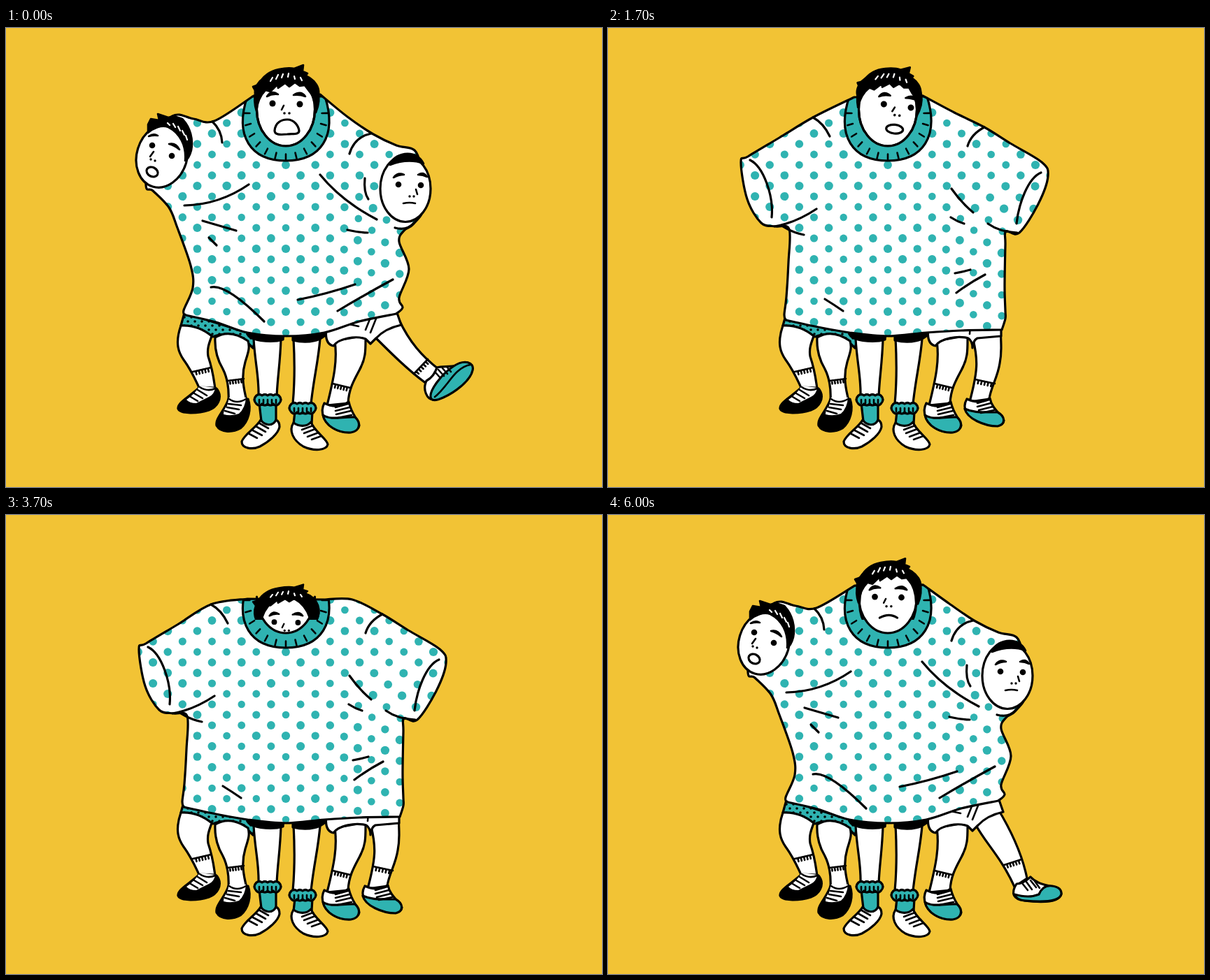
These frames come from a looping animation (852x657 px, 6.1 s). An HTML page:

```html
<!DOCTYPE html>
<html lang="en">
<head>
<meta charset="utf-8">
<title>Three in one shirt</title>
<style>
html,body{margin:0;width:100%;height:100%;overflow:hidden;background:#f2c335}
svg{display:block;width:100%;height:100%}
path,ellipse,circle{fill:none;stroke:#000;stroke-width:3.2;stroke-linecap:round;stroke-linejoin:round}
.w{fill:#fff}
.t{fill:#2fb3b1}
.k{fill:#000}
.thin{stroke-width:2.6}
.dot{fill:#000;stroke:none}
.spot{fill:#2fb3b1;stroke:none}
.shine{stroke:#fff;stroke-width:2.2}
.white{fill:#fff;stroke:none}
</style>
</head>
<body>
<svg viewBox="0 0 852 657">
  <defs>
    <clipPath id="bodyClip"><path id="bodyClipPath"/></clipPath>
    <clipPath id="leftClip"><path id="leftClipPath"/></clipPath>
    <clipPath id="rightClip"><path id="rightClipPath"/></clipPath>
    <clipPath id="neckClip">
      <path d="M300 0H500V150H300Z"/>
      <path d="M358.500 117A41.500 52 0 0 0 441.500 117Z"/>
    </clipPath>
    <clipPath id="shortsClip"><path d="M255 408L250 426Q275 427 296 442Q320 432 345 450L353 458L358 440Z"/></clipPath>
  </defs>

  <!-- left pair of legs -->
  <path class="t" d="M255 408L250 426Q275 427 296 442Q320 432 345 450L353 458L358 440Z"/>
  <g id="shortsDots" clip-path="url(#shortsClip)"></g>
  <path class="w" d="M250 426C241 452 247 465 254 475C262 486 269 499 277 517L299 517C297 500 294 485 289 470C287 458 291 450 294 441Q275 425 250 426Z"/>
  <path class="w" d="M299 443C298 462 304 478 310 488C316 500 319 515 318 533L344 533C338 510 337 495 342 478C346 465 349 458 346 448Q320 430 299 443Z"/>
  <path class="k" d="M277 514C262 528 245 536 246 545C249 553 275 552 290 547C303 542 308 530 304 521Q301 514 297 515Z"/>
  <path class="white" d="M277 512L299 515Q298 524 290 528L272 537Q262 537 258 532Q270 524 277 512Z"/>
  <path class="thin" d="M277 514Q288 521 299 516M274 518l13 8M269 523l12 7M264 528l10 6"/>
  <path class="k" d="M318 531C314 546 299 558 301 569C307 580 325 579 335 573C347 563 351 545 346 531Z"/>
  <path class="white" d="M319 529L343 529Q342 544 333 552Q322 556 311 553Q311 546 316 541Z"/>
  <path class="thin" d="M319 531Q330 539 343 531M318 538l18 2M316 543l17 3M313 548l14 4"/>

  <!-- middle pair of legs -->
  <path class="w" d="M354 445C356 480 362 500 361 528H387C388 500 392 480 393 445Z"/>
  <path class="w" d="M411 445C413 480 413 505 410 538H436C440 500 446 480 449 445Z"/>
  <path class="k" d="M345 436C344 448 380 451 396 446L397 436Z"/>
  <path class="k" d="M410 436V447C430 452 455 449 461 432Z"/>
  <path class="t" d="M362 537L365 563Q375 574 386 565V537Z"/>
  <path class="t" d="M413 549L411 567Q424 575 437 566L438 549Z"/>
  <path class="w" d="M364 561C359 571 340 582 337 592C337 602 352 604 363 599C376 592 389 581 391 571Q391 563 386 561C381 571 370 569 364 561Z"/>
  <path class="w" d="M411 565C404 576 410 590 425 599C440 606 458 605 460 596C459 588 440 577 436 564C429 572 418 570 411 565Z"/>
  <path class="thin" d="M361 565l14 8M357 570l14 8M351 575l15 8M346 580l13 7M439 569l-16 6M442 574l-16 6M447 579l-16 6M451 584l-14 5"/>
  <g id="cuffs"></g>

  <!-- right pair of legs -->
  <path class="w" d="M470 448C474 475 469 500 459 540L489 537C490 517 497 505 505 490C515 472 514 460 514 440Z"/>
  <path class="w" d="M455 537C448 550 455 566 470 574C485 581 503 580 505 569C503 560 494 553 490 535Q473 546 455 537Z"/>
  <path class="t" d="M453 554C465 562 480 556 499 557C508 565 506 577 493 579C474 580 456 569 453 554Z"/>
  <path class="thin" d="M471 543l18-5M471 548l20-5M472 553l21-5M474 558l20-4"/>
  <g id="legDown">
    <path class="w" d="M522 446C529 475 529 490 517 535L545 531C547 515 557 500 560 480C563 465 562 450 561 430Z"/>
    <path class="w" d="M513 531C506 543 511 552 527 561C543 571 564 573 566 562C563 553 549 546 546 530Q530 539 513 531Z"/>
    <path class="t" d="M510 545C525 552 540 549 557 550C568 556 569 567 557 570C538 570 513 559 510 545Z"/>
    <path class="thin" d="M528 537l17-5M528 542l19-5M530 547l20-5M533 551l19-4"/>
    <path class="w" d="M458 430Q455 452 468 455C476 444 500 440 515 444Q521 448 521 458Q522 447 528 444L562 441V420H460Z"/>
    <path class="thin" d="M518 426L517 438"/>
  </g>
  <g id="legMid">
    <path class="w" d="M526 444C540 470 562 490 581 532L599 520C593 490 580 458 557 420Z"/>
    <path class="w" d="M584 528C575 542 580 550 595 552C620 555 646 555 648 542C644 528 618 534 604 518Q593 528 584 528Z"/>
    <path class="t" d="M581 543Q602 549 616 543Q622 529 635 531Q649 533 648 543C644 555 618 554 596 552Q584 551 581 543Z"/>
    <path class="thin" d="M592 527l8 10M598 525l8 11M604 523l8 10M610 524l7 10"/>
  </g>
  <g id="legUp">
    <path class="w" d="M527 442C550 465 575 490 601 509L618 488C595 470 577 450 562 418Z"/>
    <path class="w" d="M601 505C595 518 602 531 610 532C635 525 655 500 660 479C640 487 625 483 616 486Q612 499 601 505Z"/>
    <path class="t" d="M608 531C602 521 624 494 640 484C655 474 670 478 667 490C664 505 641 522 625 529Q612 535 608 531Z"/>
    <path class="thin" d="M613 528C626 518 635 501 645 492Q655 483 664 482M613 492l8 9M618 489l8 9M624 487l7 8M631 486l5 6"/>
  </g>
  <g id="shortsOut">
    <path class="w" d="M458 430Q455 452 468 455C476 444 500 440 514 445L521 452L529 444Q542 430 565 425L558 405H470Z"/>
    <path class="thin" d="M486 423L504 427M522 412L514 432M531 411L521 436"/>
  </g>
  <g id="frills"></g>

  <!-- shirt -->
  <path id="shirt" class="white"/>
  <g clip-path="url(#bodyClip)">
    <g id="spots"></g>
    <path class="t" d="M345 98C326 155 350 190 400 190C450 190 474 155 456 98Z"/>
    <path id="ticks" class="thin"/>
  </g>
  <path id="outline"/>

  <!-- folds: d with the head out, data-in with the sleeve empty -->
  <g id="leftFolds">
    <path d="M295 134Q308 146 309 164" data-in="M293 128Q308 136 317 155"/>
    <path d="M255 254Q305 253 347 224" data-in="M238 284Q268 279 298 259"/>
    <path d="M281 276Q305 283 329 290" data-in="M250 284Q264 293 280 296"/>
    <path d="M293 371Q315 366 369 420" data-in="M310 388Q323 396 336 405"/>
    <path id="leftEdge" d="M250 125C275 148 280 210 225 240" data-in="M203 189C222 198 237 240 234 271"/>
  </g>
  <g id="rightFolds">
    <path d="M522 151Q498 156 491 180" data-in="M538 142Q519 152 514 169"/>
    <path d="M449 210Q480 248 530 274" data-in="M491 230Q505 250 522 264"/>
    <path d="M488 289Q500 292 517 293" data-in="M490 271Q499 277 509 280"/>
    <path d="M556 286Q573 291 584 278" data-in="M543 280Q560 292 585 293"/>
    <path d="M417 389Q458 381 499 367" data-in="M496 351Q507 349 518 346"/>
    <path d="M474 405Q514 381 553 360" data-in="M498 379Q518 364 539 353"/>
    <path id="rightEdge" d="M560 172C525 205 523 250 560 285" data-in="M619 207C600 215 587 252 584 280"/>
  </g>
  <path id="leftCrease" d="M290 300L301 311"/>
  <path id="rightCrease" d="M513 215Q511 235 518 245"/>

  <!-- heads -->
  <g id="leftWrap"><g id="leftHead">
    <ellipse class="w" cx="223" cy="183" rx="36" ry="46" transform="rotate(17 223 183)"/>
    <path class="k thin" d="M203 150L203 138L207 130L219 132L217 123L232 128L240 126L252 130C264 142 268 160 265 175Q262 187 256 190C258 168 248 150 232 142C222 138 210 144 203 150Z"/>
    <path class="shine" d="M231 136l3 3M239 137l3 5M246 141l3 6M252 147l3 6M257 154l2 6"/>
    <path class="k thin" d="M204 155Q211 150 217 154Q211 153 204 155ZM233 166Q243 164 248 174Q241 168 233 166Z"/>
    <circle class="dot" cx="209" cy="168" r="4.3"/><circle class="dot" cx="237" cy="183" r="4.3"/>
    <path class="thin" d="M211 177L206 184"/>
    <circle class="dot" cx="207" cy="188" r="1.7"/><circle class="dot" cx="213" cy="190" r="1.7"/>
    <ellipse class="w" cx="209" cy="206" rx="8.5" ry="6.5" transform="rotate(28 209 206)"/>
  </g></g>
  <g id="rightWrap"><g id="rightHead">
    <ellipse class="w" cx="571" cy="230" rx="36" ry="47.5"/>
    <path class="k thin" d="M549 196Q553 183 570 180Q589 178 597 194Q575 186 549 196Z"/>
    <path class="k thin" d="M554 214Q560 206 569 210Q561 210 554 214ZM589 210Q597 205 602 213Q596 210 589 210Z"/>
    <circle class="dot" cx="561" cy="224" r="4.3"/><circle class="dot" cx="593" cy="225" r="4.3"/>
    <path class="thin" d="M586 231L588 238M568 251Q577 249 585 251"/>
    <circle class="dot" cx="577" cy="241" r="1.7"/><circle class="dot" cx="583" cy="241" r="1.7"/>
  </g></g>
  <g clip-path="url(#neckClip)"><g id="head">
    <ellipse class="dot" cx="401.500" cy="92" rx="47" ry="31"/>
    <g id="skull"><ellipse class="w" cx="400" cy="117" rx="41.5" ry="52"/></g>
    <g id="face">
      <path class="k thin" d="M373 98Q379 88 389 95Q380 94 373 98ZM411 96Q422 89 428 98Q420 95 411 96Z"/>
      <circle class="dot" cx="381" cy="108" r="4.5"/><circle class="dot" cx="420" cy="109" r="4.5"/>
      <path class="thin" d="M397 111L394 117"/>
      <circle class="dot" cx="398" cy="122" r="1.8"/><circle class="dot" cx="405" cy="122" r="1.8"/>
      <path id="mouthWide" class="w" d="M384 147C385 135 394 131 402 131C412 131 418 140 419 147C419 153 410 151 402 152C392 153 384 153 384 147Z"/>
      <ellipse id="mouthSmall" class="w" cx="400" cy="142" rx="12" ry="6.3"/>
      <path id="mouthSad" d="M388 139Q402 131 414 139"/>
    </g>
    <g id="hair">
      <path class="k thin" d="M358 119Q353 104 357 91L353 84L361 81Q370 63 390 59Q404 56 412 58L425 53L424 62L431 65L428 69Q441 74 446 90Q450 104 443 121Q441 98 433 90L427 82L420 83L413 78L405 84L399 79L389 86L388 81L378 91L371 89Q360 100 358 119Z"/>
      <path class="shine" d="M378 76l3-5M386 73l3-6M394 71l2-5M403 70l1-5M412 69l1 4M421 71l2 4"/>
    </g>
  </g></g>
  <path d="M358.500 117A41.500 52 0 0 0 441.500 117"/>
</svg>
<script>
const $ = id => document.getElementById(id);
const attr = (id, name, v) => $(id).setAttribute(name, v);
const show = (id, on) => { $(id).style.display = on ? '' : 'none'; };
const mix = (a, b, k) => a.map((v, i) => v + (b[i] - v) * k);
const ramp = (t, a, b) => Math.max(0, Math.min(1, (t - a) / (b - a)));
const within = (t, a, b) => t >= a && t < b ? 1 : 0;

// Blend two paths that share the same commands
function morph(from, to, k) {
  const nums = to.match(/\d+/g);
  let i = 0;
  return from.replace(/\d+/g, v => (+v + (nums[i++] - v) * k).toFixed(1));
}

// Smooth cubic segments through a flat x,y list, without the first move
function curve(p) {
  const n = p.length / 2 - 1;
  const at = (i, c) => p[2 * Math.max(0, Math.min(n, i)) + c];
  let d = '';
  for (let i = 0; i < n; i++) {
    const lead = c => (at(i, c) + (at(i + 1, c) - at(i - 1, c)) / 6).toFixed(1);
    const tail = c => (at(i + 1, c) - (at(i + 2, c) - at(i, c)) / 6).toFixed(1);
    d += `C${lead(0)} ${lead(1)} ${tail(0)} ${tail(1)} ${at(i + 1, 0)} ${at(i + 1, 1)}`;
  }
  return d;
}
const reverse = p => p.map((_, i) => p[p.length - 2 - i + 2 * (i % 2)]);

// Sides of the shirt, neck to hem
const points = s => s.split(/[ ,]/).map(Number);
const sides = {
  left: {
    out: points('354,97 298,133 268,130 238,126 205,165 200,225 210,233 233,257 245,286 264,340 267,372 254,404 257,411'),
    in: points('352,99 293,128 245,157 200,184 190,192 199,245 219,279 240,284 259,288 258,335 255,385 252,410 254,418')
  },
  right: {
    out: points('449,95 488,127 525,152 558,168 584,175 592,200 598,255 582,281 569,290 562,306 576,345 562,386 567,400 558,409'),
    in: points('450,97 495,121 538,142 575,165 620,192 629,212 615,252 588,293 569,291 568,310 567,370 568,405 568,416 563,432')
  }
};

// One sleeve: k = 0 head out, 1 empty; returns its side of the shirt
function sleeve(side, k, far) {
  for (const f of $(side + 'Folds').children) {
    f.out = f.out || f.getAttribute('d');
    const own = f.id ? k * k : k;
    f.setAttribute('d', morph(f.out, f.dataset.in, own));
  }
  const edge = $(side + 'Edge').getAttribute('d');
  show(side + 'Edge', k > .3);
  show(side + 'Crease', k < .5);
  attr(side + 'ClipPath', 'd', `${edge}V340H${far}V100Z`);
  attr(side + 'Wrap', 'clip-path', k > .3 ? `url(#${side}Clip)` : 'none');
  show(side + 'Wrap', k < 1);
  return mix(sides[side].out, sides[side].in, k);
}

function draw(t) {
  const l = ramp(t, 900, 1300) - ramp(t, 4600, 5100) ** 2;
  const r = ramp(t, 1100, 1600) - ramp(t, 5000, 5300) ** 2;
  const drop = ramp(t, 3400, 3700) - ramp(t, 5800, 6050);
  const turn = within(t, 1700, 2200) - within(t, 2300, 2600) + within(t, 2700, 3000);
  const pose = t < 1300 ? 'legUp' : t < 1400 || t >= 6000 ? 'legMid' : 'legDown';
  const mouth = t < 1600 ? 'mouthWide' : t < 5900 ? 'mouthSmall' : 'mouthSad';

  const a = sleeve('left', l, 100), b = sleeve('right', r, 720);
  a[0] -= 7 * drop; a[1] += 21 * drop;
  b[0] += 6 * drop; b[1] += 24 * drop;
  const hem = [...a.slice(-2), 300, 421 + 7 * l, 345, 436, 400, 441, 455, 436, 505, 420 + 13 * r, ...b.slice(-2)];
  const body = `M${a[0]} ${a[1]}` + curve(a) + curve(hem) + curve(reverse(b)) + 'Z';
  for (const id of ['shirt', 'outline', 'bodyClipPath']) attr(id, 'd', body);

  const hide = k => ramp(k, .9, 1);
  attr('leftHead', 'transform', `translate(${24 * l + 45 * hide(l)} ${20 * l}) rotate(${34 * l} 215 215)`);
  attr('rightHead', 'transform', `translate(${-45 * hide(r)} ${6 * r})`);

  const size = 1 - .13 * drop;
  const shrink = `translate(400 109) scale(${size}) translate(-400 -109)`;
  attr('head', 'transform', `translate(0 ${47 * drop})`);
  attr('skull', 'transform', shrink);
  attr('face', 'transform', `translate(${13 * turn} ${3 * Math.abs(turn) - 2 * drop}) rotate(${6 * turn} 401 110) ${shrink}`);
  attr('hair', 'transform', `rotate(${7 * turn} 401 110) translate(0 ${10 * drop}) scale(1 ${1 - .2 * drop})`);

  for (const id of ['mouthWide', 'mouthSmall', 'mouthSad']) show(id, id === mouth);
  for (const id of ['legDown', 'legMid', 'legUp']) {
    show(id, id === pose);
    show(id + 'Frill', id === pose);
  }
  show('shortsOut', pose !== 'legDown');
}

// Fixed details
const circle = (x, y, r, cls) => `<circle class="${cls}" cx="${x}" cy="${y}" r="${r}"/>`;
let seed = 7;
const rand = () => (seed = seed * 16807 % 2147483647) / 2147483647;

// Staggered spots; the cloth sags a little at the lower right
let spots = '';
for (let k = -11; k <= 11; k++)
  for (let y = k % 2 ? 91 : 106; y < 450; y += 30) {
    const x = 400 + 21.1 * k;
    const sag = ramp(x, 470, 550) * ramp(y, 220, 300);
    spots += circle(x - 6 * sag, y + 6 * sag, 5.2 + rand(), 'spot');
  }
$('spots').innerHTML = spots;

let dots = '';
for (let y = 408, row = 0; y < 462; y += 6, row++)
  for (let x = 250 + row % 2 * 5; x < 360; x += 10) dots += circle(x, y, 1.8, 'dot');
$('shortsDots').innerHTML = dots;

let ticks = '';
for (let i = 0; i < 13; i++) {
  const n = (-1 + i * 182 / 12) * Math.PI / 180;
  const at = f => `${400 + 60 * f * Math.cos(n)} ${123 + 67 * f * Math.sin(n)}`;
  ticks += `M${at(.99)}L${at(.86)}`;
}
attr('ticks', 'd', ticks);

function cuff(x, y) {
  const d = `M${x - 16} ${y - 6}${'q4 -3 8 0'.repeat(4)}q6 6 0 12${'q-4 4 -8 0'.repeat(4)}q-6 -6 0 -12Z`;
  let lines = '';
  for (let i = -2; i <= 2; i++) lines += `M${x + i * 6} ${y + 5}v-5`;
  return `<path class="t" d="${d}"/><path class="thin" d="${lines}"/>`;
}
$('cuffs').innerHTML = cuff(374, 532) + cuff(424, 544);

// Sock edge with short teeth on the foot side
function frill(x, y, u, v, id = '') {
  const w = u - x, h = v - y, n = Math.hypot(w, h) / 5;
  let d = `M${x} ${y}L${u} ${v}`;
  for (let i = 1; i < 6; i++) d += `M${x + w * i / 6} ${y + h * i / 6}l${-h / n} ${w / n}`;
  return `<path class="thin" ${id && `id="${id}Frill"`} d="${d}"/>`;
}
$('frills').innerHTML = frill(267, 492, 293, 486) + frill(316, 505, 340, 502) + frill(467, 509, 492, 515) +
  frill(525, 503, 553, 509, 'legDown') + frill(566, 501, 591, 493, 'legMid') + frill(583, 495, 603, 474, 'legUp');

const start = performance.now();
let last = -1;
function tick() {
  const t = Math.floor((performance.now() - start) % 6100 / 100) * 100;
  if (t !== last) draw(last = t);
  requestAnimationFrame(tick);
}
tick();
</script>
</body>
</html>
```
